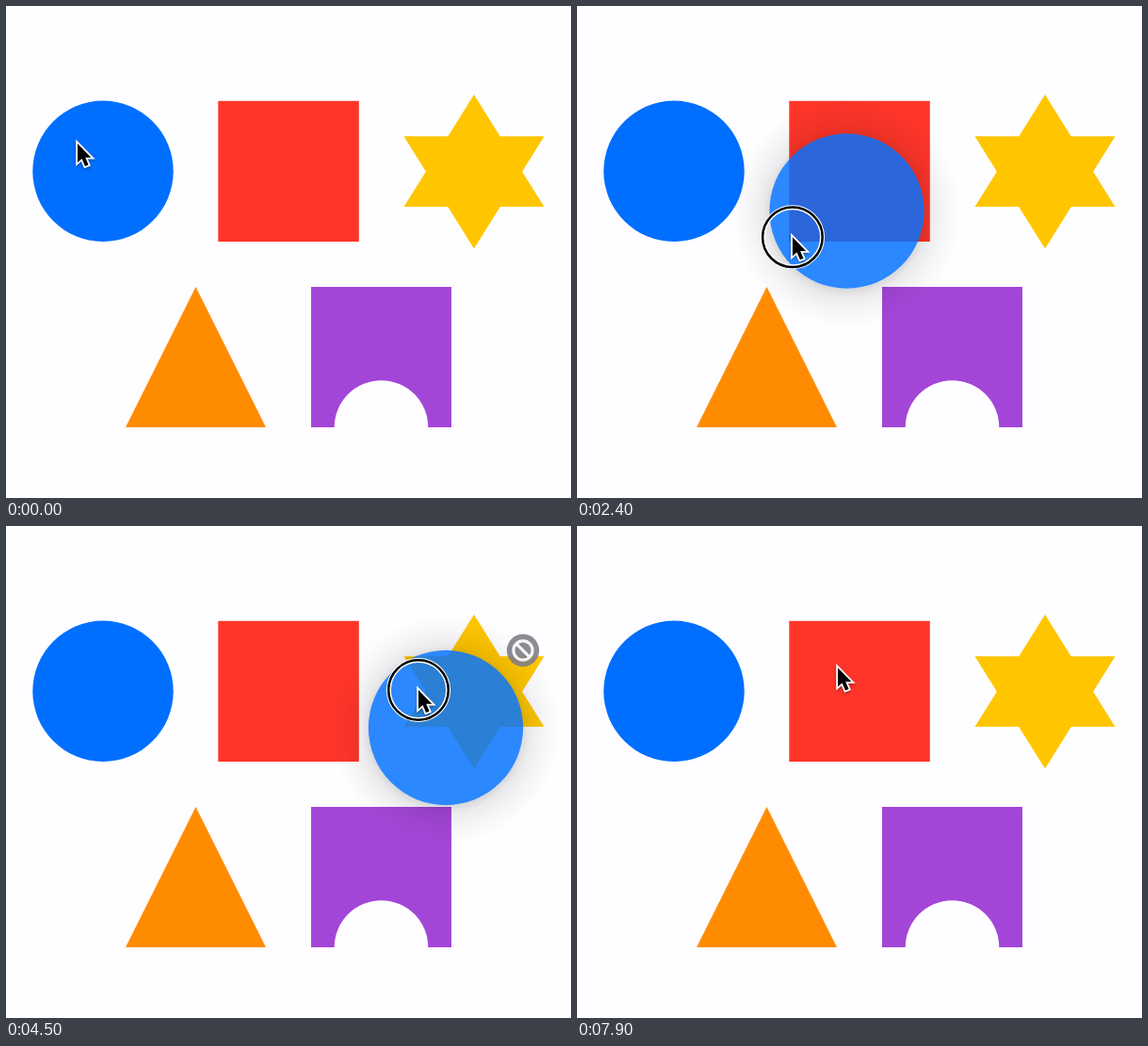
Recreate the animation shown at these times as an HTML page with a canvas. Size 600 by 522 pixels, loop 8000 ms.

```html
<!DOCTYPE html>
<html lang="en">
<head>
<meta charset="utf-8">
<title>Drag and drop shapes</title>
<style>
  html, body { margin: 0; width: 100%; height: 100%; overflow: hidden; background: #fefdff; }
  canvas { display: block; width: 600px; height: 522px; }
</style>
</head>
<body>
<canvas id="stage" width="600" height="522"></canvas>
<script>
const ctx = document.getElementById('stage').getContext('2d');
const LOOP = 8000, STEP = 100, LAG = 100;
const LIFT = 700, PRESS = 600, RELEASE = 6700;

// Pointer path: time, x, y
const PATH = [
  [0, 76, 146], [200, 76, 146], [500, 68, 150.5], [1000, 68, 150.5],
  [1300, 150, 152], [1600, 248, 150], [1800, 259, 151], [1900, 259, 151],
  [2100, 261, 143], [2300, 248, 190], [2500, 206, 305], [2700, 176, 372],
  [2850, 164, 378], [3000, 161, 374], [3100, 175, 367], [3200, 207, 363],
  [3450, 310, 361], [3700, 382, 362], [3900, 404, 343], [4150, 411, 255],
  [4400, 428.5, 186.5], [4500, 438, 174], [4800, 456, 165], [5200, 459, 162],
  [5400, 453, 159.5], [5500, 441.5, 159], [5600, 421, 160], [5900, 340, 154],
  [6200, 284, 151], [6400, 277, 150.5], [8000, 277, 150.5]
];

// Bounding boxes that refuse the drop: left, top, right, bottom
const REFUSE = [[127, 298, 276, 447], [324, 298, 473, 447], [422, 94, 572, 257]];

const clamp = v => Math.max(0, Math.min(1, v));
const ramp = (t, from, length) => {
  const u = clamp((t - from) / length);
  return u * u * (3 - 2 * u);
};

// Tangent that flattens at turning points, so the path never overshoots
function slope(i, axis) {
  const a = PATH[i - 1], b = PATH[i], c = PATH[i + 1];
  if (!a || !c) return 0;
  const before = (b[axis] - a[axis]) / (b[0] - a[0]);
  const after = (c[axis] - b[axis]) / (c[0] - b[0]);
  return before * after <= 0 ? 0 : 2 * before * after / (before + after);
}

function pointer(t) {
  t = Math.max(0, t);
  let i = 0;
  while (i < PATH.length - 2 && PATH[i + 1][0] <= t) i++;
  const a = PATH[i], b = PATH[i + 1], d = b[0] - a[0], u = (t - a[0]) / d;
  const at = k => {
    const v = 1 - u;
    return a[k] * (1 + 2 * u) * v * v + b[k] * u * u * (3 - 2 * u)
      + d * u * v * (v * slope(i, k) - u * slope(i + 1, k));
  };
  return [at(1), at(2)];
}

function refused(t) {
  const [x, y] = pointer(t);
  return t > LIFT && t < RELEASE &&
    REFUSE.some(([l, top, r, b]) => x >= l && x <= r && y >= top && y <= b);
}

function poly(points) {
  points.forEach(([x, y], i) => i ? ctx.lineTo(x, y) : ctx.moveTo(x, y));
  ctx.closePath();
}

function fill(color, trace) {
  ctx.fillStyle = color;
  ctx.beginPath();
  trace();
  ctx.fill();
}

const circle = (x, y, r) => ctx.arc(x, y, r, 0, 7);

function strokeCircle(x, y, r, width, color) {
  ctx.lineWidth = width;
  ctx.strokeStyle = color;
  ctx.beginPath();
  circle(x, y, r);
  ctx.stroke();
}

function drawShapes() {
  ctx.fillStyle = '#fefdff';
  ctx.fillRect(0, 0, 600, 522);
  fill('#006fff', () => circle(103, 175.3, 74.7));
  fill('#ff3529', () => ctx.rect(225.3, 100.7, 149.5, 149.4));
  fill('#ffc600', () => {
    poly([[497, 94], [571.5, 213], [422.5, 213]]);
    poly([[497, 257.5], [422.5, 138.3], [571.5, 138.3]]);
  });
  fill('#ff8c00', () => poly([[201.5, 298], [276, 447], [127, 447]]));
  fill('#a346d8', () => {
    ctx.moveTo(324, 298);
    ctx.lineTo(473, 298);
    ctx.lineTo(473, 447);
    ctx.lineTo(448.3, 447);
    ctx.arc(398.5, 447, 49.8, 0, Math.PI, true);
    ctx.lineTo(324, 447);
  });
}

function drawShadow(x, y, r) {
  const glow = ctx.createRadialGradient(x, y + 2, r - 2, x, y + 2, r + 40);
  [[0, .15], [.2, .08], [.5, .04], [.8, .015], [1, 0]]
    .forEach(([stop, a]) => glow.addColorStop(stop, `rgba(0,0,0,${a})`));
  ctx.fillStyle = glow;
  ctx.beginPath();
  circle(x, y, r + 44);
  ctx.closePath();
  ctx.moveTo(x + r, y);
  circle(x, y, r);
  ctx.fill('evenodd');
}

function drawBadge(x, y, amount) {
  if (amount <= 0) return;
  ctx.save();
  ctx.globalAlpha = amount;
  ctx.translate(x, y);
  ctx.scale(.2 + .8 * amount, .2 + .8 * amount);
  fill('#807f86', () => circle(0, 0, 18.7));
  strokeCircle(0, 0, 11, 3.4, '#fff');
  ctx.beginPath();
  ctx.moveTo(-7.5, -7.5);
  ctx.lineTo(7.5, 7.5);
  ctx.stroke();
  ctx.restore();
}

function drawDisc(t) {
  const lift = ramp(t, LIFT, 200), drop = clamp((t - 6740) / 360);
  if (!lift || drop === 1) return;
  const scale = 1 + .1 * lift;
  const [px, py] = pointer(t - LAG);
  const x = px + 35 * scale, y = py + 25 * scale;
  const r = 74.7 * scale * (1 - drop * drop);
  ctx.save();
  ctx.globalAlpha = lift * (1 - drop * drop);
  drawShadow(x, y, r);
  ctx.globalAlpha *= .83;
  fill('#0072ff', () => circle(x, y, r));
  ctx.restore();

  // The badge eases in and out with the share of recent time spent over a refusing shape
  let hits = 0;
  for (let k = 0; k < 20; k++) hits += refused(t - k * 10);
  drawBadge(x + 82, y - 82, hits / 20);
}

function drawPointer(t) {
  const [x, y] = pointer(t);
  if (t >= PRESS && t < RELEASE) {
    strokeCircle(x, y, 31.6, 5, '#fff');
    strokeCircle(x, y, 31.8, 2.5, '#000');
  }
  ctx.save();
  ctx.translate(x, y);
  ctx.beginPath();
  poly([[0, 0], [0, 20], [4.6, 16], [8, 24], [11.6, 22.5], [8.2, 14.7], [14.4, 14.7]]);
  ctx.lineWidth = 3.6;
  ctx.strokeStyle = '#fff';
  ctx.shadowColor = 'rgba(0,0,0,.35)';
  ctx.shadowBlur = 3;
  ctx.shadowOffsetY = 1.5;
  ctx.stroke();
  ctx.shadowColor = 'transparent';
  ctx.fillStyle = '#000';
  ctx.fill();
  ctx.restore();
}

const start = performance.now();
function frame() {
  const now = (performance.now() - start) % LOOP;
  const t = Math.floor(now / STEP) * STEP;
  drawShapes();
  drawDisc(t);
  drawPointer(t);
  requestAnimationFrame(frame);
}
frame();
</script>
</body>
</html>
```
